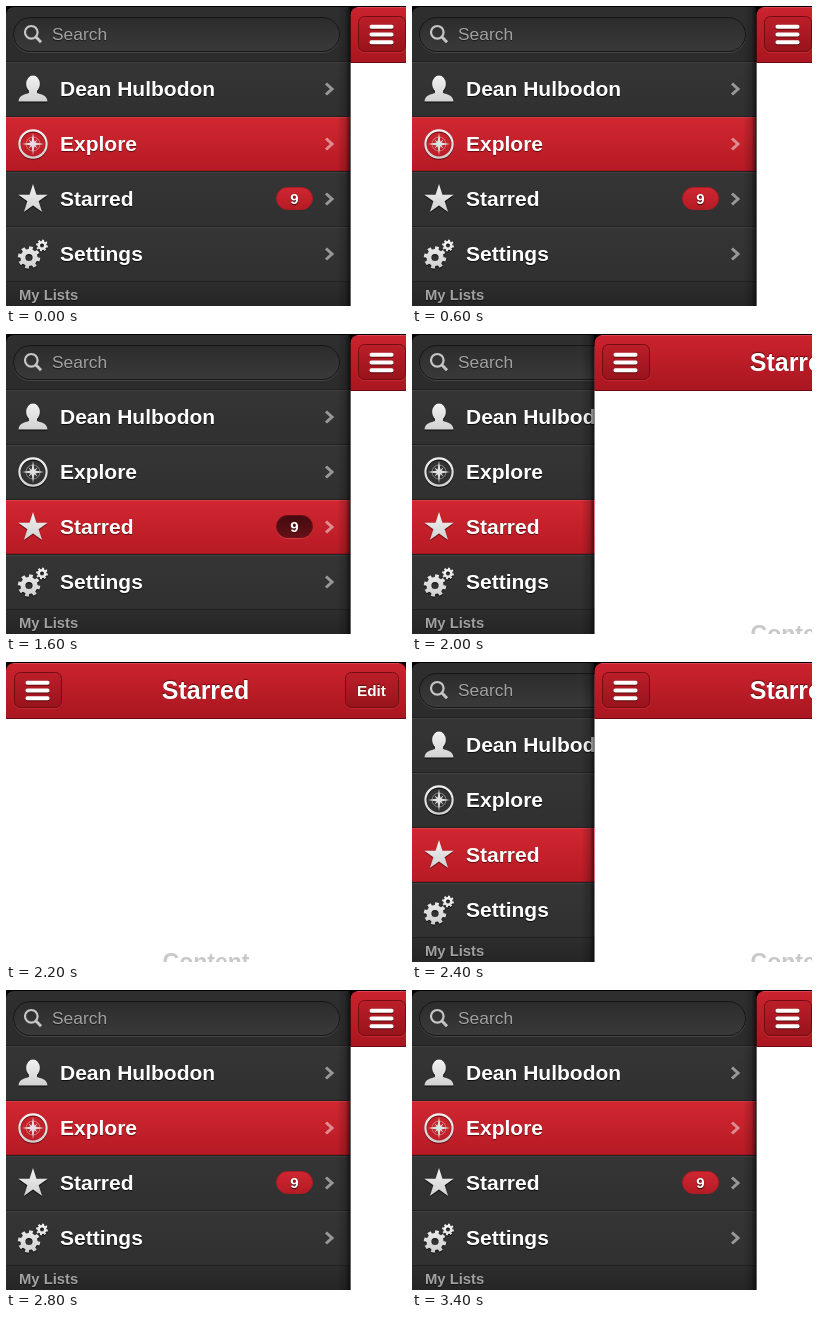
Write an HTML page with a canvas that moves like this. It is 400 by 300 pixels and loops after 3800 ms.

```html
<!DOCTYPE html>
<html lang="en">
<head>
<meta charset="utf-8">
<title>Sliding menu</title>
<style>
html, body { margin: 0; width: 100%; height: 100%; overflow: hidden; background: #000; }
canvas { display: block; }
</style>
</head>
<body>
<canvas id="stage" width="400" height="300"></canvas>
<script>
const ctx = document.getElementById('stage').getContext('2d');
const LOOP = 3800;
const OPEN = 344, HALF = 182, CLOSED = 0;
const STEPS = [
  { at: 0, panel: OPEN, active: 1 },
  { at: 1000, panel: OPEN, active: 2 },
  { at: 2000, panel: HALF, active: 2 },
  { at: 2200, panel: CLOSED, active: 2 },
  { at: 2400, panel: HALF, active: 2 },
  { at: 2600, panel: OPEN, active: 2 },
  { at: 2800, panel: OPEN, active: 1 }
];
const ROWS = [
  { label: 'Dean Hulbodon', icon: person },
  { label: 'Explore', icon: compass },
  { label: 'Starred', icon: star, badge: '9' },
  { label: 'Settings', icon: gears }
];
const ROW_TOP = 56, ROW_H = 55;

function vertical(y0, y1, ...colors) {
  const g = ctx.createLinearGradient(0, y0, 0, y1);
  colors.forEach((c, i) => g.addColorStop(i / (colors.length - 1), c));
  return g;
}

function rect(x, y, w, h, fill) {
  ctx.fillStyle = fill;
  ctx.fillRect(x, y, w, h);
}

function rounded(x, y, w, h, r, fill, stroke) {
  ctx.beginPath();
  ctx.roundRect(x, y, w, h, r);
  if (fill) { ctx.fillStyle = fill; ctx.fill(); }
  if (stroke) { ctx.strokeStyle = stroke; ctx.lineWidth = 1; ctx.stroke(); }
}

function ring(x, y, r, width, color) {
  ctx.beginPath();
  ctx.arc(x, y, r, 0, Math.PI * 2);
  ctx.strokeStyle = color;
  ctx.lineWidth = width;
  ctx.stroke();
}

function line(width, color, ...points) {
  ctx.beginPath();
  points.forEach(([x, y]) => ctx.lineTo(x, y));
  ctx.strokeStyle = color;
  ctx.lineWidth = width;
  ctx.stroke();
}

function shadow(color, dy, blur) {
  ctx.shadowColor = color;
  ctx.shadowOffsetY = dy;
  ctx.shadowBlur = blur;
}

function text(str, x, y, size, color, { weight = 'bold', align = 'left', shade, dy = 1 } = {}) {
  ctx.save();
  if (shade) shadow(shade, dy, 1);
  ctx.font = `${weight} ${size}px "Liberation Sans", Arial, sans-serif`;
  ctx.textAlign = align;
  ctx.fillStyle = color;
  ctx.fillText(str, x, y);
  ctx.restore();
}

// Star with alternating outer and inner radii
function spikes(x, y, points, outer, inner, turn = 0) {
  ctx.beginPath();
  for (let i = 0; i < points * 2; i++) {
    const a = turn - Math.PI / 2 + i * Math.PI / points;
    const r = i % 2 ? inner : outer;
    ctx.lineTo(x + r * Math.cos(a), y + r * Math.sin(a));
  }
  ctx.closePath();
  ctx.fill();
}

function person(y, ink) {
  ctx.fillStyle = ink;
  ctx.beginPath();
  ctx.moveTo(23, y);
  ctx.lineTo(31, y);
  ctx.lineTo(31, y + 4);
  ctx.bezierCurveTo(37, y + 6, 41, y + 6.5, 41.5, y + 12.5);
  ctx.lineTo(12.5, y + 12.5);
  ctx.bezierCurveTo(13, y + 6.5, 17, y + 6, 23, y + 4);
  ctx.closePath();
  ctx.ellipse(27, y - 5, 6.9, 8.5, 0, 0, Math.PI * 2);
  ctx.fill();
}

function compass(y, ink) {
  ring(27, y, 13.6, 2.2, ink);
  ctx.shadowColor = 'transparent';
  ctx.globalAlpha = 0.45;
  ring(27, y, 7, 1, ink);
  ctx.globalAlpha = 1;
  ctx.fillStyle = ink;
  spikes(27, y, 4, 6.5, 1.6, Math.PI / 4);
  spikes(27, y, 4, 11, 2.1);
}

function star(y, ink) {
  ctx.fillStyle = ink;
  spikes(27, y + 0.5, 5, 15.5, 5.9);
}

function gear(x, y, r, hole, ink) {
  const teeth = 8, pitch = Math.PI * 2 / teeth;
  ctx.beginPath();
  for (let i = 0; i < teeth; i++) {
    for (const [offset, reach] of [[-0.29, 0.76], [-0.22, 1], [0.22, 1], [0.29, 0.76]]) {
      const a = (i + offset) * pitch + 0.2;
      ctx.lineTo(x + r * reach * Math.cos(a), y + r * reach * Math.sin(a));
    }
  }
  ctx.closePath();
  ctx.moveTo(x + hole, y);
  ctx.arc(x, y, hole, 0, Math.PI * 2);
  ctx.fillStyle = ink;
  ctx.fill('evenodd');
}

function gears(y, ink) {
  gear(23, y + 3.5, 11.3, 3.6, ink);
  gear(36, y - 8.5, 6, 2, ink);
}

function search() {
  rect(0, 1, 344, 55, vertical(1, 56, '#2f2f2f', '#2b2b2b'));
  rounded(7.5, 12.5, 326, 34, 17, null, 'rgba(255,255,255,.12)');
  rounded(7.5, 11.5, 326, 34, 17, vertical(11, 46, '#2c2c2c', '#3a3a3a'), '#161616');
  ring(25.3, 26.3, 6.3, 2.2, '#c6c6c6');
  line(3, '#c6c6c6', [29.8, 30.8], [35, 36.2]);
  text('Search', 46, 34, 17.4, '#a2a2a2', { weight: 'normal', shade: '#161616' });
}

function menuRow(row, index, active) {
  const top = ROW_TOP + index * ROW_H;
  const mid = top + 27;
  const bottom = top + ROW_H;
  if (active) {
    rect(0, top, 344, ROW_H, vertical(top, bottom, '#d12731', '#b61a24'));
    rect(0, top, 344, 1, '#dc3b45');
    rect(0, bottom - 2, 344, 1, '#a5161f');
  } else {
    rect(0, top, 344, ROW_H, vertical(top, bottom, '#353535', '#303030'));
    rect(0, top, 344, 1, '#414141');
  }
  rect(0, bottom - 1, 344, 1, '#222');

  const shade = active ? 'rgba(70,0,0,.75)' : 'rgba(0,0,0,.8)';
  ctx.save();
  shadow(shade, 1, 1);
  row.icon(mid, vertical(mid - 14, mid + 14, '#f2f2f2', '#cfcfcf'));
  ctx.restore();
  text(row.label, 54, top + 34, 21, '#fff', { shade });
  line(3, active ? '#dd8d92' : '#989898', [320, mid - 5.5], [326, mid], [320, mid + 5.5]);

  if (row.badge) {
    const fill = active ? vertical(181, 204, '#430a0f', '#641118') : vertical(181, 204, '#d02731', '#b51a24');
    if (active) rounded(270.5, mid - 10.5, 36, 22, 11, null, 'rgba(255,120,120,.3)');
    rounded(270.5, mid - 11.5, 36, 22, 11, fill, active ? '#6d0f16' : '#ab1c25');
    text(row.badge, 288.5, mid + 5, 15, '#fff', { align: 'center', shade });
  }
}

function menu(panelX, active) {
  ctx.save();
  ctx.beginPath();
  ctx.roundRect(0, 1, 360, 310, [8, 0, 0, 0]);
  ctx.clip();
  search();
  rect(0, 55, 344, 1, '#202020');
  ROWS.forEach((row, i) => menuRow(row, i, i === active));
  rect(0, 276, 344, 24, vertical(276, 300, '#2d2d2d', '#252525'));
  text('My Lists', 13, 294, 14.8, '#a2a2a2', { shade: '#111' });
  const fade = ctx.createLinearGradient(panelX - 13, 0, panelX, 0);
  fade.addColorStop(0, 'rgba(0,0,0,0)');
  fade.addColorStop(0.65, 'rgba(0,0,0,.18)');
  fade.addColorStop(1, 'rgba(0,0,0,.6)');
  rect(panelX - 13, 0, 13, 300, fade);
  ctx.restore();
}

function button(x, w) {
  rounded(x + 0.5, 11.5, w - 1, 35, 6, null, 'rgba(255,110,110,.2)');
  rounded(x + 0.5, 10.5, w - 1, 35, 6, vertical(10, 46, '#bd1f29', '#97131c'), '#710c13');
}

function panel(x) {
  // Soft left edge while the menu is visible
  const edge = Math.min(x, 0.6);
  ctx.save();
  ctx.translate(x, 0);
  rect(0, 0, 400, 12, '#000');
  rect(edge, 56, 400, 244, '#fff');
  rounded(edge, 1, 400 - edge, 56, [8, 8, 0, 0], vertical(1, 57, '#cb232e', '#a9161f'));
  rect(7, 1, 386, 1, '#d8444d');
  rect(edge, 56, 400, 1, '#6b0b11');
  button(8, 48);
  ctx.save();
  shadow('rgba(70,0,0,.75)', 1, 1);
  for (let i = 0; i < 3; i++) rounded(19.5, 18.8 + i * 7.7, 24, 4, 1.8, '#fff');
  ctx.restore();
  const shade = 'rgba(70,0,0,.75)';
  text('Starred', 199.5, 37, 25, '#fff', { align: 'center', shade, dy: -1 });
  button(339, 54);
  text('Edit', 365.5, 34, 15.3, '#fff', { align: 'center', shade, dy: -1 });
  text('Content', 200, 307.5, 23, '#c9c9c9', { align: 'center' });
  ctx.restore();
}

function draw(now) {
  const t = now % LOOP;
  const step = STEPS.findLast(s => t >= s.at);
  rect(0, 0, 400, 300, '#000');
  if (step.panel > 0) menu(step.panel, step.active);
  panel(step.panel);
}

const start = performance.now();
function tick() {
  draw(performance.now() - start);
  requestAnimationFrame(tick);
}
tick();
</script>
</body>
</html>
```
